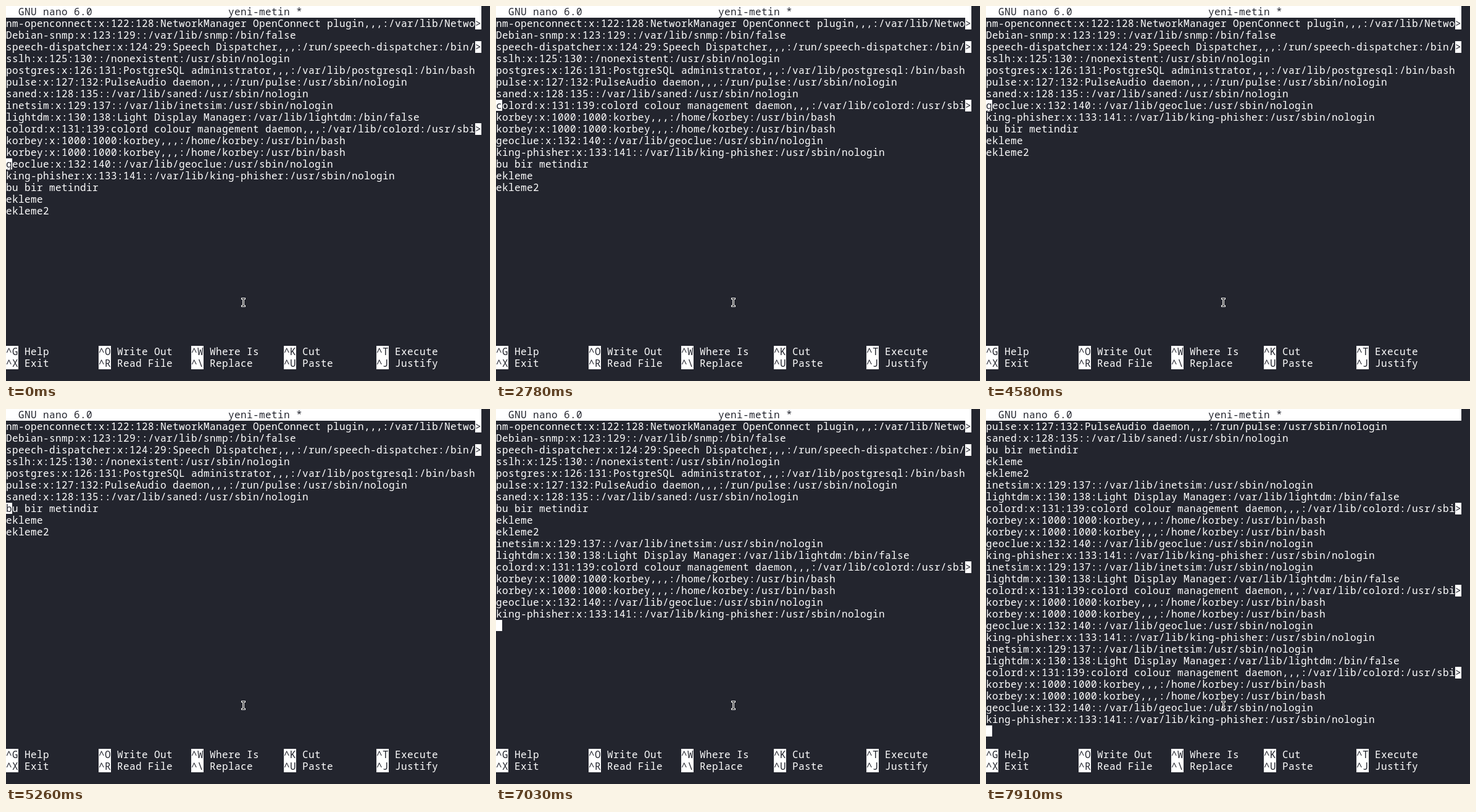
An HTML page that plays this animation: 784x608 px, repeating every 8370 ms.

```html
<!DOCTYPE html>
<html lang="tr">
<head>
<meta charset="utf-8">
<title>nano</title>
<style>
  :root { --bg: #23252e; --fg: #fff; }
  html, body { margin: 0; width: 100%; height: 100%; overflow: hidden; background: var(--bg); }
  #stage {
    position: relative; width: 784px; height: 608px; overflow: hidden;
    color: var(--fg);
    font: 500 16px/19px "Noto Sans Mono", monospace;
    letter-spacing: calc(10px - 1ch);
    white-space: pre;
    font-variant-ligatures: none;
  }
  #stage > * { position: absolute; }
  .inverse { background: var(--fg); color: var(--bg); }
  #title { left: 0; top: 0; width: 770px; height: 19px; }
  #text { left: 0; top: 19px; }
  .row { height: 19px; }
  .more { position: absolute; left: 760px; width: 10px; height: 19px; overflow: hidden; }
  #cursor { left: 0; width: 10px; height: 18px; overflow: hidden; }
  .key { width: 20px; height: 19px; overflow: hidden; }
  #pointer { left: 381px; top: 473px; }
</style>
</head>
<body>
<div id="stage">
  <div id="title" class="inverse">  GNU nano 6.0                      yeni-metin *</div>
  <div id="text"></div>
  <div id="cursor" class="inverse"></div>
  <svg id="pointer" width="7" height="15" fill="none">
    <path id="beam" stroke="#fff" stroke-width="3" d="M0 1.5h7M3.5 1v13M0 13.5h7"/>
    <path stroke="#111" d="M1 1.5h5M3.5 1v13M1 13.5h5"/>
  </svg>
</div>
<script>
const ROW = 19, COLUMNS = 76, VISIBLE_ROWS = 27, LOOP = 8370;
const stage = document.getElementById('stage');
const text = document.getElementById('text');
const cursor = document.getElementById('cursor');

// A trailing ">" past the last column marks a line that runs off screen.
const user = 'korbey:x:1000:1000:korbey,,,:/home/korbey:/usr/bin/bash';
const file = [
  'nm-openconnect:x:122:128:NetworkManager OpenConnect plugin,,,:/var/lib/Netwo>',
  'Debian-snmp:x:123:129::/var/lib/snmp:/bin/false',
  'speech-dispatcher:x:124:29:Speech Dispatcher,,,:/run/speech-dispatcher:/bin/>',
  'sslh:x:125:130::/nonexistent:/usr/sbin/nologin',
  'postgres:x:126:131:PostgreSQL administrator,,,:/var/lib/postgresql:/bin/bash',
  'pulse:x:127:132:PulseAudio daemon,,,:/run/pulse:/usr/sbin/nologin',
  'saned:x:128:135::/var/lib/saned:/usr/sbin/nologin',
  'inetsim:x:129:137::/var/lib/inetsim:/usr/sbin/nologin',
  'lightdm:x:130:138:Light Display Manager:/var/lib/lightdm:/bin/false',
  'colord:x:131:139:colord colour management daemon,,,:/var/lib/colord:/usr/sbi>',
  user,
  user,
  'geoclue:x:132:140::/var/lib/geoclue:/usr/sbin/nologin',
  'king-phisher:x:133:141::/var/lib/king-phisher:/usr/sbin/nologin',
  'bu bir metindir',
  'ekleme',
  'ekleme2'
];

// The editing commands; each one changes the editor state.
const commands = {
  up(ed) { ed.line--; },
  down(ed) { ed.line++; },
  cut(ed) { ed.clipboard.push(...ed.lines.splice(ed.line, 1)); },
  paste(ed) {
    ed.lines.splice(ed.line, 0, ...ed.clipboard);
    ed.line += ed.clipboard.length;
  }
};

// When each key is pressed, in ms.
const presses = {
  up: [330, 790, 860, 930, 1190],
  cut: [2780, 2780, 3660, 4190, 4580, 4790, 5260],
  down: [6500, 6650, 6850],
  paste: [7030, 7430, 7910]
};
const keys = Object.entries(presses)
  .flatMap(([name, times]) => times.map(time => ({ time, run: commands[name] })));

function add(parent, className, content) {
  const el = document.createElement('div');
  el.className = className;
  el.textContent = content;
  parent.append(el);
  return el;
}

function place(el, x, y) {
  el.style.left = x + 'px';
  el.style.top = y + 'px';
}

const menu = [
  ['^G Help', '^O Write Out', '^W Where Is', '^K Cut', '^T Execute'],
  ['^X Exit', '^R Read File', '^\\ Replace', '^U Paste', '^J Justify']
];
menu.forEach((items, r) => items.forEach((item, c) => {
  const x = c * 150, y = (VISIBLE_ROWS + 2 + r) * ROW;
  place(add(stage, 'key inverse', item.slice(0, 2)), x, y);
  place(add(stage, 'label', item.slice(3)), x + 30, y);
}));

function show(pressed) {
  const ed = { lines: [...file], line: file.lastIndexOf(user) + 1, clipboard: [] };
  pressed.forEach(key => key.run(ed));
  const scroll = Math.max(0, ed.line - VISIBLE_ROWS + 1);

  text.replaceChildren();
  ed.lines.slice(scroll).forEach((content, i) => {
    add(text, 'row', content.slice(0, COLUMNS));
    if (content.length > COLUMNS) add(text, 'more inverse', '>').style.top = i * ROW + 'px';
  });
  cursor.textContent = (ed.lines[ed.line] || ' ')[0];
  place(cursor, 0, (ed.line - scroll + 1) * ROW);
}

let shown;
function tick() {
  const now = performance.now() % LOOP;
  const pressed = keys.filter(key => key.time <= now);
  if (pressed.length !== shown) {
    show(pressed);
    shown = pressed.length;
  }
  requestAnimationFrame(tick);
}
tick();
</script>
</body>
</html>
```
